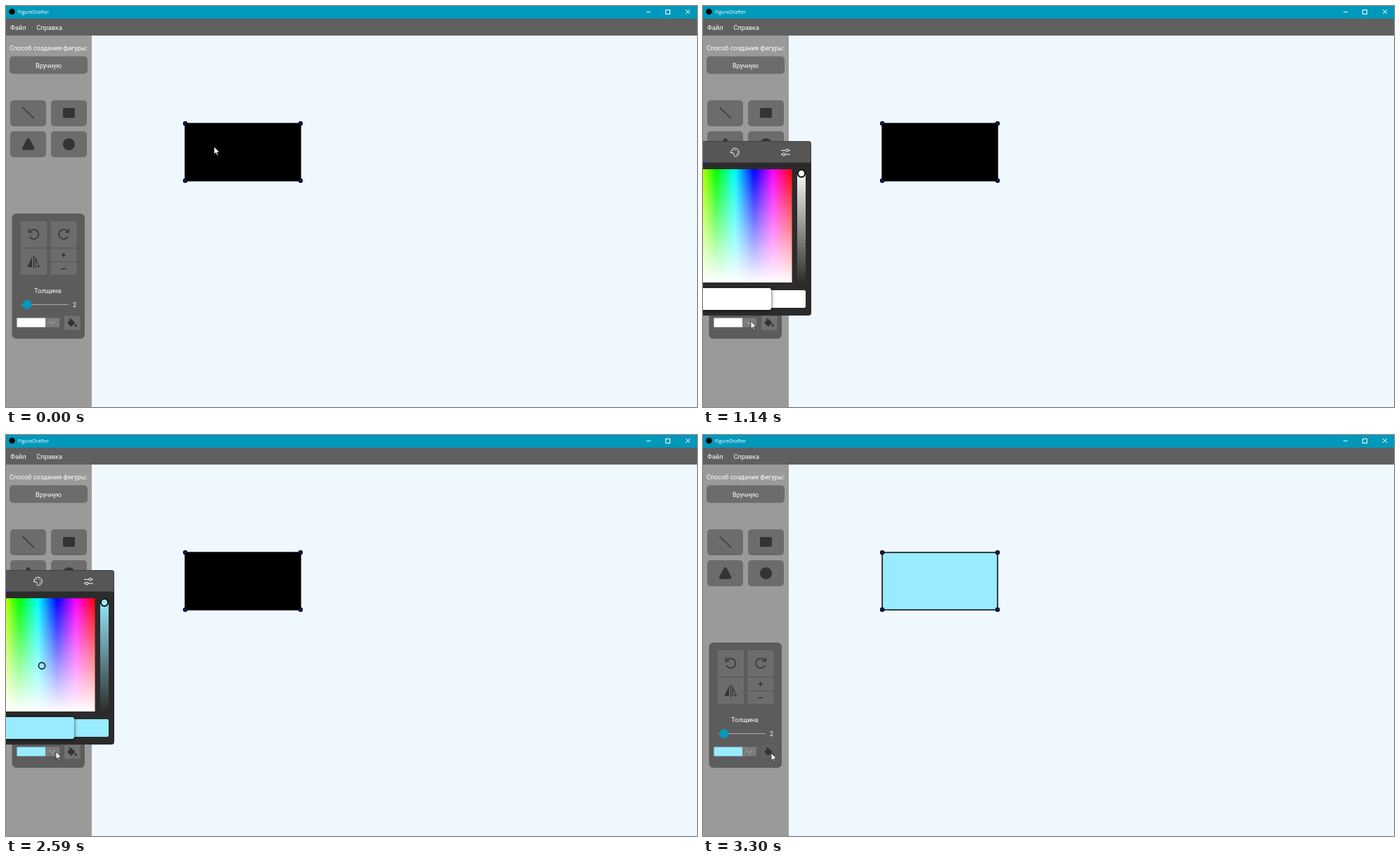
An HTML page with a canvas that plays this animation: 983 px wide and 570 px high, repeating every 4240 ms.

```html
<!DOCTYPE html>
<html lang="ru">
<head>
<meta charset="utf-8">
<title>FigureDrafter</title>
<style>
html, body { margin: 0; width: 100%; height: 100%; overflow: hidden; background: #f0f8ff; }
canvas { display: block; width: 983px; height: 570px; }
</style>
</head>
<body>
<canvas id="stage" width="983" height="570"></canvas>
<script>
const g = document.getElementById('stage').getContext('2d');
const LOOP = 4240;
const ACCENT = '#0099bc', DARK = '#333535', PICKED = '#99ebff';
const UI = 'Roboto, "Noto Sans", sans-serif';

// Moments at which the screen refreshes
const span = (a, b, n) => Array.from({ length: n },
  (_, i) => Math.round((a + (b - a) * i / (n - 1)) / 10) * 10);
const ticks = [0, ...span(130, 600, 8), 730, 870, ...span(1070, 1570, 8),
  ...span(1630, 2110, 8), ...span(2180, 2660, 8), 2730,
  ...span(2870, 3010, 3), 3230, 3300];

// Pointer path: time, x, y
const path = [
  [1000, 70, 451], [1070, 68, 449.5], [1140, 68, 448], [1290, 65, 430],
  [1430, 61, 388], [1500, 59, 360], [1630, 53, 335], [1770, 51, 328.5],
  [1910, 51, 328.5], [1970, 51.5, 331], [2110, 55, 352], [2320, 63, 402],
  [2520, 70, 444], [2590, 71, 450], [2800, 71, 450], [2870, 77, 450.5],
  [2940, 90, 451.5], [3010, 97, 452]
];

const within = (t, a, b) => t >= a && t < b;

function pointer(t) {
  if (t < 130) return [296, 200];
  if (t < 1000) {
    const u = Math.min(1, (t - 60) / 540), e = u * u * (3 - 2 * u);
    return [296 - 226 * e, 200 + 251 * e];
  }
  for (let i = 1; i < path.length; i++) {
    const [t0, x0, y0] = path[i - 1], [t1, x1, y1] = path[i];
    if (t <= t1) {
      const u = (t - t0) / (t1 - t0);
      return [x0 + (x1 - x0) * u, y0 + (y1 - y0) * u];
    }
  }
  return [97, 452];
}

function box(x, y, w, h, fill, r = 0) {
  g.beginPath();
  g.roundRect(x, y, w, h, r);
  g.fillStyle = fill;
  g.fill();
}

function disc(x, y, r, fill, stroke, width = 1) {
  g.beginPath();
  g.arc(x, y, r, 0, Math.PI * 2);
  if (fill) { g.fillStyle = fill; g.fill(); }
  if (stroke) { g.strokeStyle = stroke; g.lineWidth = width; g.stroke(); }
}

function poly(points, fill, stroke, width = 1, closed = true) {
  g.beginPath();
  points.forEach(([x, y]) => g.lineTo(x, y));
  if (closed) g.closePath();
  if (fill) { g.fillStyle = fill; g.fill(); }
  if (stroke) { g.strokeStyle = stroke; g.lineWidth = width; g.stroke(); }
}

const line = (x0, y0, x1, y1, color, width = 1) =>
  poly([[x0, y0], [x1, y1]], null, color, width, false);

function label(text, x, y, size = 9.15, align = 'left', font = UI) {
  g.font = `${size}px ${font}`;
  g.textAlign = align;
  g.fillStyle = '#fff';
  g.fillText(text, x, y);
}

function windowFrame() {
  box(0, 0, 983, 570, '#f0f8ff');
  box(0, 0, 983, 18, ACCENT);
  disc(8.5, 8, 4.3, '#000');
  label('FigureDrafter', 17, 11, 7.1, 'left', '"Open Sans", "Noto Sans", sans-serif');
  line(911, 8.5, 917, 8.5, '#fff');
  g.strokeRect(938.5, 5.5, 6, 6);
  line(967, 5, 973, 11, '#fff');
  line(973, 5, 967, 11, '#fff');
  box(0, 18, 983, 24, '#606060');
  label('Файл', 6, 34);
  label('Справка', 43.5, 34);
}

function rotateIcon(x, y, flip) {
  g.save();
  g.translate(x, y);
  g.scale(flip, 1);
  g.beginPath();
  g.arc(0, 0.5, 6.8, Math.PI * 1.2, Math.PI * 2.85);
  g.strokeStyle = DARK;
  g.lineWidth = 1.6;
  g.stroke();
  poly([[-7, -7.5], [-7, -2.5], [-2, -2.5]], null, DARK, 1.6, false);
  g.restore();
}

function bucketIcon() {
  g.save();
  g.translate(93.2, 450);
  g.lineJoin = 'round';
  poly([[-0.5, -4.6], [4.6, 0.4], [-0.5, 5.2], [-5.3, 0.4]], DARK, DARK, 1.2);
  line(-3.3, -6.2, 0.5, -2.4, DARK, 1.3);
  g.beginPath();
  g.moveTo(6, 1.8);
  g.quadraticCurveTo(9.4, 6, 6, 6);
  g.quadraticCurveTo(2.8, 6, 6, 1.8);
  g.fill();
  g.restore();
}

function sidebar(t, color) {
  box(0, 42, 122, 528, '#9a9a9a');
  label('Способ создания фигуры:', 60.5, 63, 9.15, 'center');
  box(5, 71.5, 111, 25, '#6c6c6c', 5);
  label('Вручную', 60.5, 87.5, 9.15, 'center');

  for (const x of [6, 64]) for (const y of [134, 178]) box(x, y, 51, 37, '#6c6c6c', 5);
  line(23.5, 144, 40, 160, DARK, 1.3);
  box(81, 145, 17, 14, DARK, 2);
  g.lineJoin = 'round';
  poly([[31.7, 190.5], [37.8, 202.2], [25.6, 202.2]], DARK, DARK, 5);
  g.lineJoin = 'miter';
  disc(89.5, 196.5, 8.6, DARK);

  box(8.5, 295, 103.5, 178, '#5c5c5c', 6);
  for (const [x, y, h] of [[21, 306, 37], [63.5, 306, 37], [21, 345, 37], [63.5, 345, 18], [63.5, 364.5, 17.5]])
    box(x, y, 37, h, '#6c6c6c');
  rotateIcon(39.5, 324, 1);
  rotateIcon(82, 324, -1);
  poly([[37, 356.5], [37, 371], [30.5, 371]], DARK);
  poly([[42, 358.5], [42, 370.5], [47.3, 370.5]], null, DARK, 1.2);
  line(39.5, 355, 39.5, 373, DARK, 1.3);
  line(78.8, 354, 85.2, 354, '#252525', 1.2);
  line(82, 350.8, 82, 357.2, '#252525', 1.2);
  line(78.8, 373.5, 85.2, 373.5, '#252525', 1.2);

  label('Толщина', 59.5, 407.5, 9.15, 'center');
  line(22, 424.5, 89, 424.5, '#aaa');
  disc(30, 424.5, 6.5, ACCENT);
  label('2', 95, 428);

  const pressed = within(t, 730, 1140);
  box(15.5, 443.5, 41, 13, color);
  box(56, 443.5, 20, 13, pressed ? '#999' : '#7c7c7c');
  if (pressed) line(16, 443.5, 16, 456.5, '#bbb');
  poly([[62, 448], [66, 452], [70, 448]], null, '#b4b4b4', 1, false);

  box(83, 440.5, 22.5, 20, t >= 2940 ? '#606060' : '#717171', 1.5);
  bucketIcon();
}

function figure(filled) {
  box(253.6, 165.8, 166.8, 84, 'rgba(130,165,180,.45)');
  box(255, 167, 164, 81.5, filled ? PICKED : '#000');
  g.strokeStyle = '#000';
  g.lineWidth = 1.4;
  g.strokeRect(255, 167, 164, 81.5);
  for (const x of [255, 419]) for (const y of [167, 248.3]) {
    disc(x, y, 3.2, '#000');
    disc(x, y, 1.8, '#101a9a');
  }
}

function tabIcons() {
  g.beginPath();
  g.arc(45.5, 208, 5.8, Math.PI * 0.95, Math.PI * 2.5);
  g.bezierCurveTo(42.5, 213.5, 46, 209.5, 43, 209);
  g.quadraticCurveTo(40, 209.8, 39.8, 207.5);
  g.strokeStyle = '#fff';
  g.lineWidth = 1;
  g.stroke();
  for (const [x, y] of [[43, 205.3], [46.5, 204.8], [48.8, 207.4], [48.3, 210.5]]) disc(x, y, 0.7, '#fff');
  for (const [x, y] of [[119.8, 205.3], [114.8, 211]]) {
    line(111, y, 124, y, '#fff');
    disc(x, y, 1.9, '#565656', '#fff');
  }
}

function spectrum() {
  const right = 126.5, top = 232, h = 161, perPx = 360 / 161.6;
  const hue = g.createLinearGradient(0, 0, right, 0);
  for (let i = 0; i <= 48; i++) {
    const u = i / 48;
    hue.addColorStop(u, `hsl(${360 - perPx * right * (1 - u)},100%,50%)`);
  }
  box(0, top, right, h, hue);
  const pale = g.createLinearGradient(0, top, 0, top + h);
  pale.addColorStop(0, 'rgba(255,255,255,0)');
  pale.addColorStop(1, '#fff');
  box(0, top, right, h, pale);
}

function alphaBar(color) {
  g.save();
  g.beginPath();
  g.roundRect(134, 232, 12, 161, 6);
  g.clip();
  box(134, 232, 12, 161, '#292929');
  for (let y = 0; y < 54; y++)
    for (let x = 0; x < 4; x++)
      if ((x + y) % 2) box(134 + x * 3, 232 + y * 3, 3, 3, '#323232');
  const fade = g.createLinearGradient(0, 232, 0, 393);
  fade.addColorStop(0, color);
  fade.addColorStop(1, color + '00');
  box(134, 232, 12, 161, fade);
  g.restore();
  disc(140, 238, 5.2, color, '#111', 2);
}

function popup(color, marked) {
  box(0, 192, 154, 248, '#2b2b2b', [0, 4, 4, 0]);
  box(0, 192.5, 153.5, 30, '#565656', [0, 4, 0, 0]);
  box(0, 220, 6, 1.5, '#3450c8');
  tabIcons();
  spectrum();
  alphaBar(color);
  box(97, 404, 49, 25, color, [0, 2, 2, 0]);
  g.save();
  g.shadowColor = 'rgba(0,0,0,.75)';
  g.shadowBlur = 5;
  g.shadowOffsetY = 1;
  box(-6, 401, 103, 31, color, 3);
  g.restore();
  if (marked) disc(51, 328, 4.6, null, '#16191c', 1.6);
}

function cursor(x, y) {
  g.save();
  g.translate(x, y);
  poly([[0, 0], [0, 10.7], [2.5, 8.4], [4.2, 12.3], [5.9, 11.6], [4.2, 7.9], [7.6, 7.7]],
    '#fff', '#111', 0.7);
  g.restore();
}

function draw(t) {
  const color = t >= 1770 ? PICKED : '#ffffff';
  const [x, y] = pointer(t);
  const click = within(t, 730, 870) || within(t, 1770, 1910) ||
    within(t, 2660, 2730) || within(t, 3230, 3300);
  windowFrame();
  sidebar(t, color);
  figure(t >= 3300);
  if (within(t, 1140, 2660)) popup(color, t >= 1770);
  if (click) disc(x, y, 7.2, 'rgba(240,235,20,.68)');
  cursor(x, y);
}

function frame(now) {
  const t = now % LOOP;
  draw(ticks.filter(k => k <= t).pop());
  requestAnimationFrame(frame);
}
frame(0);
</script>
</body>
</html>
```
